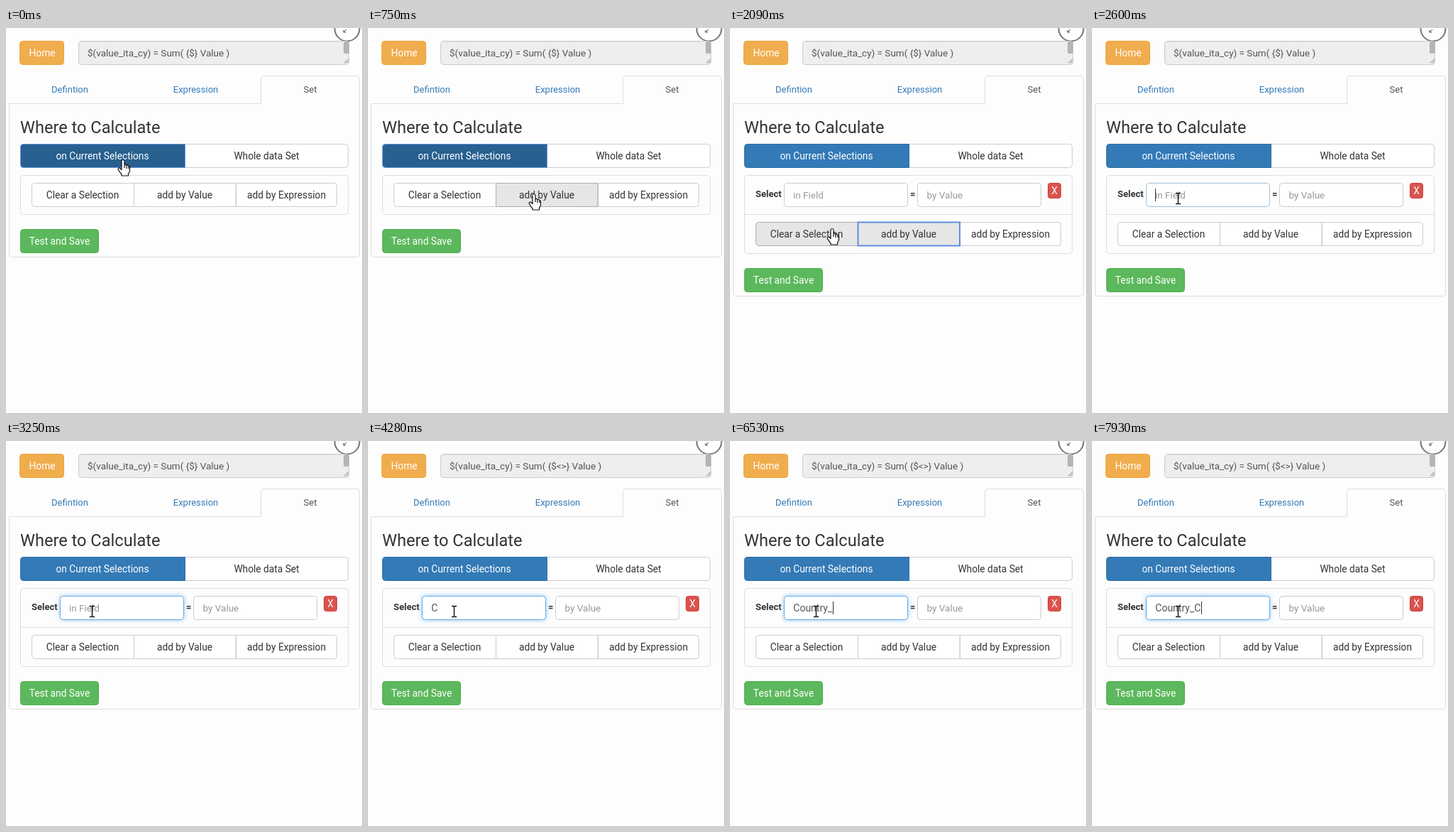
Recreate the animation shown at these times as an HTML page. Size 502 px wide and 542 px high, loop 8000 ms.

```html
<!DOCTYPE html>
<html lang="en">
<head>
<meta charset="utf-8">
<title>Set editor</title>
<style>
  html, body { margin: 0; width: 100%; height: 100%; overflow: hidden; background: #fdfdfd; }
  svg { display: block; width: 502px; height: 542px; }
  text { font: 13.75px Roboto, sans-serif; fill: #333; }
  .mid { text-anchor: middle; }
  .light { fill: #fff; }
  .tab { font-size: 13px; }
  .link { fill: #337ab7; }
  .bold { font-size: 13px; font-weight: bold; }
  .hint { fill: #999; font-size: 13.5px; }
  .line { fill: none; stroke: #ddd; }
  .button { fill: #fff; stroke: #ccc; }
  #add.hover { fill: #e6e6e6; stroke: #adadad; }
  #add.focus { fill: #e6e6e6; stroke: #5f8fdc; stroke-width: 2; }
  #clear.hover { fill: #e6e6e6; stroke: #adadad; }
  #current { fill: #337ab7; stroke: #2e6da4; }
  #current.focus { fill: #286090; stroke: #5f96dc; }
  #field { fill: #fff; stroke: #ccc; }
  #field.fading { stroke: #9dbfdd; }
  #field.focus { stroke: #66afe9; filter: drop-shadow(0 0 3px rgba(102, 175, 233, .7)); }
</style>
</head>
<body>
<svg viewBox="0 0 502 542">
  <circle cx="481" cy="1" r="17.5" fill="#fff" stroke="#777" stroke-width="2"/>
  <path d="M480 2l-4 4m0-3v3h3" fill="none" stroke="#444"/>

  <rect x="19.5" y="18.5" width="62" height="33" rx="4" fill="#f0ad4e" stroke="#eea236"/>
  <text class="mid light" x="51" y="40">Home</text>

  <rect x="102.5" y="18.5" width="381" height="33" rx="4" fill="#eee" stroke="#ccc"/>
  <path d="M104 19.5h370" stroke="#e2e2e2"/>
  <rect x="476" y="19" width="8" height="17" rx="2" fill="#b5b5b5"/>
  <path d="M477 49.5l6-6m-3 6l3-3" stroke="#777"/>
  <text id="formula" x="115" y="40" style="font-size:13.5px;fill:#555"></text>

  <path id="panel" class="line"/>
  <text class="mid tab link" x="90" y="91">Defintion</text>
  <text class="mid tab link" x="267.5" y="91">Expression</text>
  <text class="mid tab" x="429" y="91" style="fill:#555">Set</text>

  <text x="20" y="148" style="font-size:23.6px">Where to Calculate</text>
  <path class="button" d="M252.5 163.5H478.5q4 0 4 4V192.5q0 4-4 4H252.5z"/>
  <path id="current" d="M252.5 163.5H24.5q-4 0-4 4V192.5q0 4 4 4H252.5z"/>
  <text class="mid light" x="136" y="185">on Current Selections</text>
  <text class="mid" x="367.5" y="185">Whole data Set</text>
  <rect id="well" class="line" x="20.5" y="207.5" width="462" rx="4"/>

  <g id="row">
    <path class="line" d="M20 262.5H483"/>
    <text class="bold" x="36" y="238">Select</text>
    <rect id="field" x="76.5" y="218.5" width="174" height="33" rx="4"/>
    <text id="hint" class="hint" x="89" y="240">in Field</text>
    <text id="typed" x="89.3" y="240" style="font-size:14px;fill:#555"></text>
    <path id="caret" d="M.5 226V244" stroke="#333"/>
    <text class="bold" x="254" y="238">=</text>
    <rect class="button" x="264.5" y="218.5" width="174" height="33" rx="4"/>
    <text class="hint" x="277.5" y="240">by Value</text>
    <rect x="448.5" y="218.5" width="18" height="21" rx="3" fill="#d9534f" stroke="#d43f3a"/>
    <text class="mid light" x="457.5" y="234">X</text>
  </g>

  <g id="actions">
    <path id="clear" class="button" d="M180.5 218.5H40.5q-4 0-4 4V247.5q0 4 4 4H180.5z"/>
    <path class="button" d="M324.5 218.5H462.5q4 0 4 4V247.5q0 4-4 4H324.5z"/>
    <path id="add" class="button" d="M180.5 218.5h143.500v33h-143.500z"/>
    <text class="mid" x="108" y="240">Clear a Selection</text>
    <text class="mid" x="252" y="240">add by Value</text>
    <text class="mid" x="395.5" y="240">add by Expression</text>
    <rect x="20.5" y="283.5" width="110" height="33" rx="4" fill="#5cb85c" stroke="#4cae4c"/>
    <text class="mid light" x="75.5" y="305">Test and Save</text>
  </g>

  <g id="pointer" stroke-linejoin="round">
    <path id="hand" fill="#fff" stroke="#111" stroke-width="1.2"
      d="M-2 2Q0-1 2 2V8Q4 6 5 9Q7 7 8 10Q9.500 9 9.500 12V16Q9.500 18 7.500 20V23H-2V21Q-5 18-7 13.500Q-6 11-4 12.500L-2 14.500ZM2 8v4M5 9v4M8 10v3"/>
    <path id="arrow" fill="#fff" stroke="#111" d="M.5.5V16L4 12.500l2.500 6 2.500-1-2.500-5.500h5z"/>
    <path id="beam" fill="none" stroke="#111" stroke-width="1.4" d="M-3.500-7.500h2.500l1 1 1-1h2.500M0-6.500V6.500M-3.500 7.500h2.500l1-1 1 1h2.500"/>
  </g>
</svg>
<script>
const $ = id => document.getElementById(id);
const LOOP = 8000;

// [time, shape, x, y]
const pointerSteps = [
  [0, 'hand', 165, 185], [370, 'hand', 173, 194], [490, 'arrow', 194, 215],
  [630, 'hand', 222, 228], [750, 'hand', 234, 233], [1530, 'beam', 234.5, 234],
  [1820, 'beam', 205, 248], [1940, 'arrow', 171, 265], [2090, 'hand', 144, 282],
  [2230, 'arrow', 127, 260], [2350, 'beam', 121.5, 240]
];
// [time, typed letters, caret x]
const typingSteps = [
  [0, 0, 89], [3750, 1, 98], [4410, 2, 106], [4710, 3, 114], [4840, 4, 122],
  [5090, 5, 127], [5350, 6, 132], [5600, 7, 139], [6530, 8, 145], [7930, 9, 154]
];
const caretOff = [[0, 2600], [3250, 3750], [4280, 4410], [6100, 6530], [7160, 7660]];

const within = (t, from, to) => t >= from && t < to;
const stepAt = (steps, t) => steps.findLast(step => t >= step[0]);
const show = (id, on) => $(id).style.display = on ? '' : 'none';
const setClass = (id, name) => $(id).setAttribute('class', name);

function draw(t) {
  const open = t >= 1530, shift = open ? 55 : 0;
  const [, shape, x, y] = stepAt(pointerSteps, t);
  const [, count, caretX] = stepAt(typingSteps, t);

  $('panel').setAttribute('d', `M4.5 106.5H359.5V71.5q0-4 4-4H494.5q4 0 4 4V${318.5 + shift}q0 4-4 4H8.5q-4 0-4-4z`);
  $('well').setAttribute('height', 55 + shift);
  $('actions').setAttribute('transform', `translate(0 ${shift})`);
  show('row', open);

  setClass('current', open ? '' : 'focus');
  setClass('add', 'button ' + (within(t, 1530, 2600) ? 'focus' : within(t, 630, 1530) ? 'hover' : ''));
  setClass('clear', 'button ' + (within(t, 2090, 2230) ? 'hover' : ''));
  setClass('field', t >= 2750 ? 'focus' : t >= 2600 ? 'fading' : '');

  $('formula').textContent = `$(value_ita_cy) = Sum( {$${count ? '<>' : ''}} Value )`;
  $('typed').textContent = 'Country_C'.slice(0, count);
  show('hint', !count);
  show('caret', !caretOff.some(([from, to]) => within(t, from, to)));
  $('caret').setAttribute('transform', `translate(${caretX} 0)`);

  for (const id of ['hand', 'arrow', 'beam']) show(id, id === shape);
  $('pointer').setAttribute('transform', `translate(${x} ${y})`);
}

const start = performance.now();
function tick() {
  draw((performance.now() - start) % LOOP);
  requestAnimationFrame(tick);
}
tick();
</script>
</body>
</html>
```
